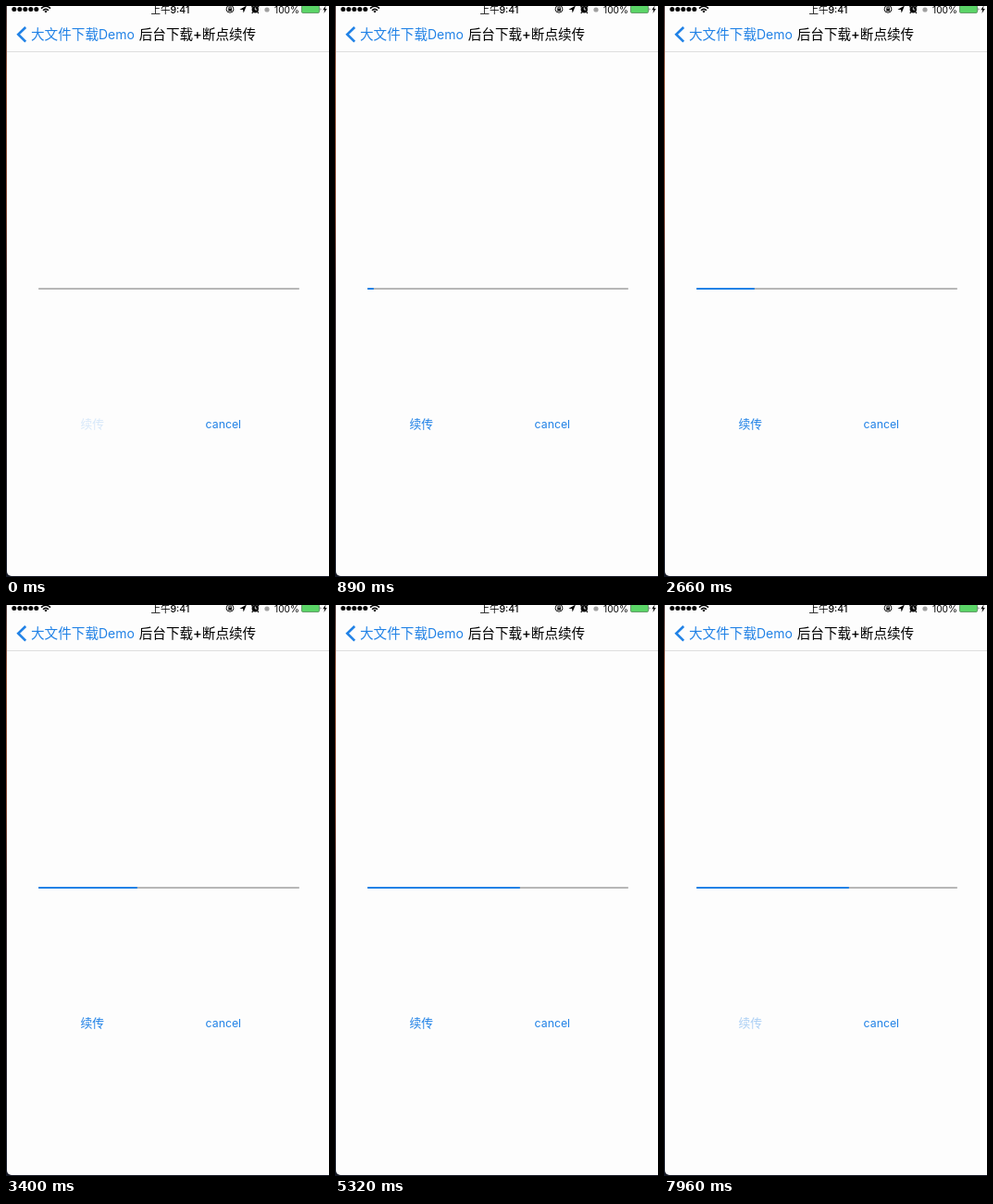
These frames come from a looping animation (349x618 px, 8 s). An HTML page:

```html
<!DOCTYPE html>
<html lang="zh-CN">
<head>
<meta charset="utf-8">
<title>后台下载</title>
<style>
  html, body { margin: 0; width: 100%; height: 100%; overflow: hidden; background: #fff; }
  svg { display: block; width: 100%; height: 100%; }
  text { font-family: Inter, "Noto Sans CJK SC", "Noto Sans CJK", sans-serif; white-space: pre; }
  .blue { fill: #2182e6; }
</style>
</head>
<body>
<svg viewBox="0 0 349 618">
  <defs>
    <linearGradient id="desktop" x1="0" y1="0" x2="0" y2="1">
      <stop offset="0" stop-color="#4a3a3c"/>
      <stop offset=".12" stop-color="#94533a"/>
      <stop offset=".36" stop-color="#7c4230"/>
      <stop offset=".5" stop-color="#3a2a30"/>
      <stop offset="1" stop-color="#171a26"/>
    </linearGradient>
  </defs>
  <rect width="349" height="618" fill="url(#desktop)"/>
  <rect x="1" y="-10" width="370" height="627" rx="5" fill="#fdfdfd"/>
  <rect x="1" y="49" width="348" height="1" fill="#dedede"/>

  <!-- status bar -->
  <g id="signal"></g>
  <g fill="none" stroke="#000" stroke-width="1.5">
    <path d="M38 2.6Q43 -2 48 2.6M40 4.7Q43 2 46 4.7"/>
    <path d="M41.4 5.7Q43 4.4 44.6 5.7L43 7.4Z" fill="#000" stroke="none"/>
  </g>
  <text x="156.5" y="7.7" font-size="10.5" font-weight="500">上午9:41</text>
  <g fill="none" stroke="#111">
    <circle cx="242" cy="3.3" r="3.9"/>
    <path d="M240.9 3V2a1.2 1.2 0 0 1 2.4 0V3"/>
    <rect x="240.2" y="2.8" width="3.8" height="2.8" fill="#111" stroke="none"/>
  </g>
  <path d="M260 -.5L256.7 7.5L256 4H252.4Z"/>
  <circle cx="269.3" cy="3.8" r="3.7"/>
  <path d="M265.3 1.2L267.4 -.6M273.3 1.2L271.2 -.6M266.8 6.5L265.8 8M271.8 6.5L272.8 8" stroke="#000" stroke-width="1.3"/>
  <path d="M269.3 1.5V4H271.3" fill="none" stroke="#fff" stroke-width=".8"/>
  <circle cx="282" cy="4" r="2.6" fill="#a0a0a0"/>
  <text x="290" y="7.6" font-size="10.2">100%</text>
  <rect x="319.5" y="-.5" width="19" height="8" rx="1.2" fill="#5bd467" stroke="#4a7a50" stroke-width=".7"/>
  <path d="M339.6 2Q341.4 3.5 339.6 5Z" fill="#333"/>
  <path d="M345.6 -.5L342.3 4.2H344.3L343.5 8L346.8 3H344.8Z"/>

  <!-- navigation bar -->
  <path d="M21.2 23L13.2 30.8L21.2 38.6" fill="none" stroke="#2182e6" stroke-width="2.6"/>
  <text class="blue" x="27" y="36" font-size="14.6">大文件下载<tspan font-size="14">Demo</tspan></text>
  <text x="143.7" y="36" font-size="14.6" font-weight="500">后台下载+断点续传</text>

  <!-- download controls -->
  <rect x="35" y="305" width="282" height="2" rx=".8" fill="#b7b7b7"/>
  <rect id="progress" class="blue" x="35" y="305" height="2" rx=".8"/>
  <text id="resume" class="blue" x="80.5" y="457" font-size="12.8">续传</text>
  <text id="cancel" class="blue" x="215.6" y="457" font-size="12.3">cancel</text>
</svg>
<script>
const LOOP = 8000, STEP = 147.4;
const byId = id => document.getElementById(id);

// Each key is [step, value].
const progressKeys = [[3, 35], [6, 42], [8, 48], [13, 75], [16, 94], [18, 98], [20, 98], [27, 200]];
const resumeKeys = [[0, .17], [1, .37], [4, 1], [51, 1], [52, .17], [53, .17], [54, .37]];
const cancelKeys = [[25, 1], [26, .2], [27, .6], [28, .8], [30, 1]];

function sample(keys, step) {
  if (step <= keys[0][0]) return keys[0][1];
  for (let i = 1; i < keys.length; i++) {
    const [a, from] = keys[i - 1], [b, to] = keys[i];
    if (step <= b) return from + (to - from) * (step - a) / (b - a);
  }
  return keys[keys.length - 1][1];
}

function render(time) {
  const step = Math.floor(time / STEP);
  byId("progress").setAttribute("width", Math.round(sample(progressKeys, step)) - 35);
  byId("resume").setAttribute("opacity", sample(resumeKeys, step));
  byId("cancel").setAttribute("opacity", sample(cancelKeys, step));
}

byId("signal").innerHTML = Array.from({ length: 5 },
  (_, i) => `<circle cx="${8.8 + i * 6}" cy="3.5" r="2.5"/>`).join("");

const start = performance.now();
function frame() {
  render((performance.now() - start) % LOOP);
  requestAnimationFrame(frame);
}
frame();
</script>
</body>
</html>
```
